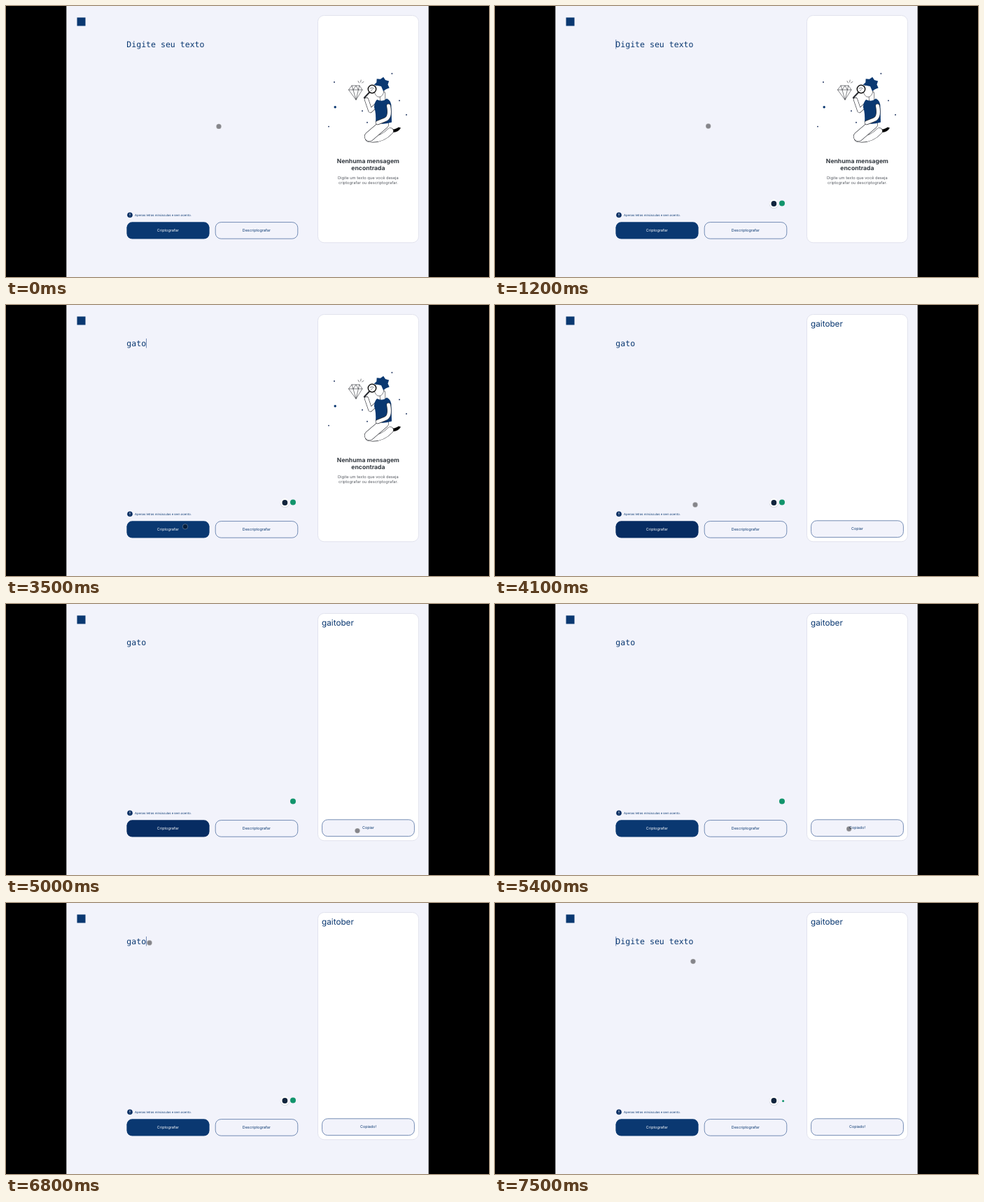
Recreate the animation shown at these times as an HTML page. Size 690 by 388 pixels, loop 8 s.

```html
<!DOCTYPE html>
<html lang="pt-BR">
<head>
<meta charset="utf-8">
<title>Criptografador de texto</title>
<style>
  html, body { margin: 0; width: 100%; height: 100%; overflow: hidden; background: #000; }
  svg { display: block; width: 100vw; height: 100vh; }
  text { font-family: Inter, sans-serif; fill: #0a3871; text-rendering: geometricPrecision; }
  .mono { font: 11.55px "DejaVu Sans Mono", monospace; }
  .label { font-size: 5.4px; text-anchor: middle; }
  .title { font-size: 8.6px; font-weight: 700; text-anchor: middle; fill: #343a41; }
  .sub { font-size: 5.72px; text-anchor: middle; fill: #595d64; }
  .outline { fill: #f2f3fb; stroke: #5472a3; stroke-width: .8; }
  .ink { fill: #fff; stroke: #2b2d33; stroke-width: .6; }
  .line { fill: none; stroke-linecap: round; stroke-linejoin: round; }
  .navy { fill: #0a3871; }
</style>
</head>
<body>
<svg viewBox="0 0 690 388">
  <rect width="690" height="388"/>
  <rect x="86.3" width="517.4" height="388" fill="#f2f3fb"/>
  <rect class="navy" x="101.5" y="16.5" width="12" height="12"/>

  <text id="entry" class="mono" x="172.3" y="58.8"></text>
  <rect id="caret" y="48" width=".8" height="13.5" fill="#5674a6"/>

  <circle cx="177" cy="299.2" r="3.8" fill="#0a2f63"/>
  <path d="M177 297v2.6M177 300.7v.7" stroke="#fff" stroke-width=".8"/>
  <text x="184" y="300.8" font-size="4.27">Apenas letras minúsculas e sem acento.</text>

  <rect id="encrypt" x="172.4" y="309.3" width="118.2" height="24.2" rx="8"/>
  <text class="label" x="231.3" y="323.1" style="fill:#fff">Criptografar</text>
  <rect class="outline" x="299.2" y="309.6" width="117.6" height="23.6" rx="8"/>
  <text class="label" x="357.8" y="323.1">Descriptografar</text>

  <g id="chip">
    <circle cx="398.4" cy="283.5" r="6.6" fill="#d6d8e0"/>
    <circle cx="398.4" cy="283" r="6.2" fill="#fff"/>
    <circle cx="398.4" cy="283" r="3.9" fill="#10243d"/>
  </g>
  <circle id="helper" fill="#12946c"/>

  <rect x="445.5" y="13.5" width="144" height="325.3" rx="9" fill="#fff" stroke="#dcdeea" stroke-width=".8"/>

  <g id="empty">
    <path class="line" stroke="#1b2f5c" stroke-width="1.9"
      d="M469 109h0M551.4 96.8h0M572 155.8h0M562 135.4h0M509 150.2h0M516 166.8h0M461 172.6h0"/>
    <circle class="navy" cx="470.2" cy="144.8" r="1.7"/>
    <path class="ink" d="M494 114h11l4 6-9 14.400-10.500-14.400z"/>
    <path class="ink line" d="M489.500 120H509M494 114l2 6 4 14.400 3.400-14.400 1.600-6M496 120l4-6 3.400 6"/>
    <path class="ink line" d="M503 107.500l1.500 2.500M507.200 106l-.6 3M511 108.400l-2.400 1.600"/>
    <g id="figure"></g>
    <text class="title" x="517.4" y="224.6">Nenhuma mensagem</text>
    <text class="title" x="517.4" y="234.8">encontrada</text>
    <text class="sub" x="517.4" y="248.4">Digite um texto que você deseja</text>
    <text class="sub" x="517.4" y="255.4">criptografar ou descriptografar.</text>
  </g>

  <g id="result">
    <text x="451" y="31.2" font-size="11.75">gaitober</text>
    <rect id="copyBox" class="outline" x="451.6" y="308.8" width="131.8" height="23.8" rx="8"/>
    <text id="copy" class="label" x="517.5" y="322.3"></text>
  </g>

  <circle id="pointer" r="3.7" fill="#000" fill-opacity=".45" stroke="#fff" stroke-opacity=".4" stroke-width=".7"/>
</svg>
<script>
const LOOP = 8000, TICK = 100, CHAR = 6.95;
const WORD = 'gato', FIRST_KEY = 840, KEY_GAP = 530;
const ENCRYPT = 3900, COPY = 5200, REFOCUS = 6700, CLEAR = 7000;

const $ = id => document.getElementById(id);
const set = (id, attrs) => Object.entries(attrs).forEach(([k, v]) => $(id).setAttribute(k, v));
const show = (id, on) => set(id, { visibility: on ? 'visible' : 'hidden' });
const clamp = (v, lo, hi) => Math.min(hi, Math.max(lo, v));

// A limb is a thick white stroke over a slightly thicker dark one.
const limb = (d, width) => [['#2b2d33', width + 1.2], ['#fff', width]]
  .map(([color, w]) => `<path class="line" d="${d}" stroke="${color}" stroke-width="${w}"/>`).join('');

// Spiky hair: a fan whose radius alternates, closed at the temple.
function hair(cx, cy) {
  const tips = Array.from({ length: 10 }, (_, i) => {
    const a = Math.PI * (1 + i * 0.14), r = i % 2 ? 8.5 : 11.5;
    return `${cx + r * Math.cos(a)},${cy + r * Math.sin(a)}`;
  });
  return `<polygon class="navy" points="${tips.join(' ')} ${cx + 2},${cy + 9} ${cx - 1},${cy + 2}"/>`;
}

$('figure').innerHTML = [
  '<path d="M548 177q8 0 13-3.500l3 1q-4 8-16 6z"/>',
  limb('M518 190Q536 193 549 179', 8.5),
  limb('M540 169L519 187', 13),
  limb('M538 126V133', 7),
  '<ellipse class="ink" cx="533" cy="121" rx="6.800" ry="9.300"/>',
  hair(537, 113),
  limb('M529 142L520.500 150L515 134', 5),
  '<path class="navy" d="M530 134q8 4 14-1.500 7 3 6.500 13l.5 21q-12 4-23 .5 1-13-2-22 0-7 4-11z"/>',
  limb('M546.500 143Q550 160 541 163L531 167', 5),
  '<path class="ink line" d="M518.800 124l-7 7.500" style="stroke-width:2"/>',
  '<circle class="ink" cx="523" cy="119" r="5.700" style="stroke:#111;stroke-width:1.500"/>',
  '<path class="ink line" d="M520 118q3-2 5.500 0M521 121.500l2.500-2"/>'
].join('');

// Pointer stops: [time, x, y]
const stops = [
  [0, 304, 172.4], [200, 304.7, 172], [3100, 304.7, 172], [3500, 256, 317.3], [3900, 256, 317.3],
  [4100, 286, 286], [5000, 502, 324.6], [5600, 507, 321], [6000, 306.8, 126.8],
  [6600, 205, 57], [7000, 205, 57], [7400, 283, 83.6], [LOOP, 283, 83.6]
];

function pointerAt(t) {
  const i = stops.findIndex(([time]) => time > t);
  const [t0, x0, y0] = stops[i - 1], [t1, x1, y1] = stops[i];
  const u = (t - t0) / (t1 - t0), k = u * u * (3 - 2 * u);
  return { cx: x0 + (x1 - x0) * k, cy: y0 + (y1 - y0) * k };
}

function draw(t) {
  const encrypted = t >= ENCRYPT, copied = t >= COPY, cleared = t >= CLEAR;
  const keys = clamp(Math.floor((t - FIRST_KEY) / KEY_GAP), 0, WORD.length);
  const text = cleared ? '' : WORD.slice(0, keys);

  $('entry').textContent = text || 'Digite seu texto';
  set('caret', { x: 172.4 + text.length * CHAR });
  show('caret', t >= 500 && !encrypted || t >= REFOCUS);
  show('chip', t >= 1000 && t < 4800 || t >= REFOCUS);
  set('helper', cleared
    ? { r: 1.5, cx: 411.6, cy: 283.6 }
    : { r: clamp((t - 600) / 50, 0, 4), cx: 410, cy: 282.6 });
  set('encrypt', { fill: encrypted && !copied ? '#072c62' : '#0a3871' });
  show('empty', !encrypted);
  show('result', encrypted);
  $('copy').textContent = copied ? 'Copiado!' : 'Copiar';
  set('pointer', pointerAt(t));
  show('pointer', t < 2400 || t >= 3100);
}

const begin = performance.now();
function tick() {
  const t = (performance.now() - begin) % LOOP;
  draw(Math.floor(t / TICK) * TICK);
  requestAnimationFrame(tick);
}
tick();
</script>
</body>
</html>
```
